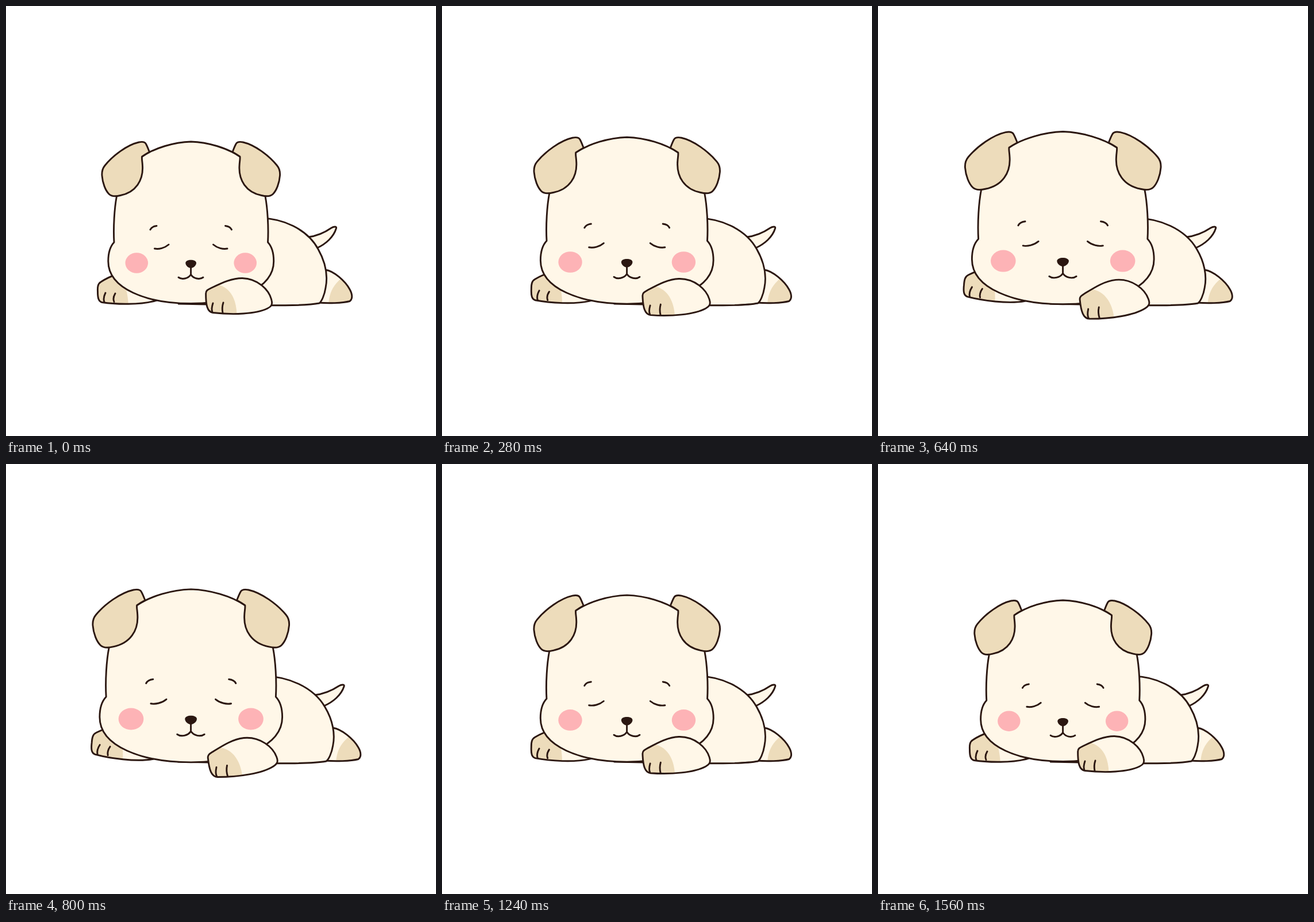
Animation, 748 px wide and 748 px high, one loop 1.64 s. Source, as an HTML page:

```html
<!DOCTYPE html>
<html lang="en">
<head>
<meta charset="utf-8">
<title>Sleeping puppy</title>
<style>
html, body { margin: 0; width: 100%; height: 100%; overflow: hidden; background: #fff; }
svg { display: block; width: 100%; height: 100%; }
path { vector-effect: non-scaling-stroke; }
.line { fill: none; stroke: #2b1711; stroke-width: 2.9; stroke-linecap: round; stroke-linejoin: round; }
.cream { fill: #fff7e8; }
.tan { fill: #eddcbb; }
.blush { fill: #fdb3b6; }
.dark { fill: #2b1711; }
</style>
</head>
<body>
<svg viewBox="0 0 748 748">
  <defs>
    <path id="footShape" d="M556 459C570 461 590 478 598 493C603 502 603 510 598 513.5C585 517 560 517.5 543 516L530 480Z"/>
    <path id="farShape" d="M192 467C183 470 174 474 165 480C160 483 159 488 159.5 497C159.5 508 161 514 167 515.5C190 519 235 520.5 262 512L240 470Z"/>
    <path id="nearShape" d="M347.7 500C347.7 495 351 493.5 356 491C375 482 392 473.5 411 473.5C438 474 458 494 462 512C464 520 461 523 455 526C435 536 395 537.5 360 533.5C350 532 347.5 520 347.7 500Z"/>
    <clipPath id="footClip"><use href="#footShape"/></clipPath>
    <clipPath id="farClip"><use href="#farShape"/></clipPath>
    <clipPath id="nearClip"><use href="#nearShape"/></clipPath>
    <g id="half">
      <path class="line tan" d="M249.5 254C247.5 249 246 244.5 243.5 240C241.5 236 237 235.8 231 237C211 241.5 186 260 172 277.5C167.5 283 166.5 288 167 295C168 308 173 321 179 327C184 332 191 331.5 199 329.5C226 324 239 303 237.5 278C237.2 270 236 267 236.5 262Q243 257.5 249.5 254Z"/>
      <ellipse class="blush" cx="227.3" cy="447" rx="19.8" ry="17.8"/>
      <path class="line" d="M258.5 422C266 423.5 276 421 283 415M251 389C253 385 257 383 262 382.5"/>
    </g>
  </defs>

  <g id="rear">
    <path class="line cream" d="M525 402C543 400 556 393 566 386C570 383.5 575.5 383 574.5 386.5C570 402 556 414 541 421L520 415Z"/>
    <use href="#footShape" class="cream"/>
    <path class="tan" clip-path="url(#footClip)" d="M583 474C568 487 562 500 561 520L610 520L610 474Z"/>
    <use href="#footShape" class="line"/>
    <path class="line cream" d="M440 369.5C480 368 524 388 543 423C556 446 560 470 556 490C554 503 549 514 545 517C520 522 460 521 400 520L300 518L330 400Z"/>
  </g>

  <g id="farArm">
    <use href="#farShape" class="cream"/>
    <path class="tan" clip-path="url(#farClip)" d="M150 460L195 460C206 478 212 497 213 522L150 525Z"/>
    <use href="#farShape" class="line"/>
    <path class="line" d="M173 499C170 505 169.5 511 171 515M190 500C187 505 186.5 511 188 514.5"/>
  </g>

  <g id="head">
    <path class="line cream" d="M321.75 236C352 237 385 247 407 262C428 275 445 300 451 331C455 352 457 385 455.5 411C463 419 465.7 432 465.7 444C465.7 492 398.5 517.5 321.75 517.5C245 517.5 177.8 492 177.8 444C177.8 432 180.5 419 188 411C186.5 385 188.5 352 192.5 331C198.5 300 215.5 275 236.5 262C258.5 247 291.5 237 321.75 236Z"/>
    <use href="#half"/>
    <use href="#half" transform="matrix(-1 0 0 1 643.5 0)"/>
    <path class="dark" d="M312.3 447C312.3 440 331 440 331 447C331 452 325 456 321.6 456C318 456 312.3 452 312.3 447Z"/>
    <path class="line" d="M321.6 455V467M300 472C306 476.5 317 474.5 321.6 467C326 474.5 337 476.5 343 472"/>
  </g>

  <g id="nearArm">
    <use href="#nearShape" class="cream"/>
    <path class="tan" clip-path="url(#nearClip)" d="M340 480L367 484C389 489 401.5 508 401.5 540L340 540Z"/>
    <use href="#nearShape" class="line"/>
    <path class="line" d="M360 517C358 523 357.5 529 359 532.5M378 516C376 522 376 529 377 534"/>
  </g>
</svg>
<script>
const LOOP = 1640, STEP = 40, LAST = 1560;

// Breath level over time: steady rise, rounded peak, steady fall.
const KEYS = [[0, 0], [160, .26], [440, .69], [640, 1], [740, 1.075], [960, .852], [1240, .452], [1560, -.058]];

const part = id => document.getElementById(id);
const rear = part('rear'), farArm = part('farArm'), head = part('head'), nearArm = part('nearArm');

function slope(i) {
  const a = KEYS[Math.max(i - 1, 0)], b = KEYS[Math.min(i + 1, KEYS.length - 1)];
  return (b[1] - a[1]) / (b[0] - a[0]);
}

function breath(t) {
  let i = 0;
  while (i < KEYS.length - 2 && t > KEYS[i + 1][0]) i++;
  const [t0, v0] = KEYS[i], [t1, v1] = KEYS[i + 1];
  const w = t1 - t0, u = (t - t0) / w, r = 1 - u;
  return r * r * ((1 + 2 * u) * v0 + u * w * slope(i)) +
         u * u * ((3 - 2 * u) * v1 - r * w * slope(i + 1));
}

// Move, turn and scale a part around its pivot.
function pose(el, x, y, { dx = 0, dy = 0, turn = 0, sx = 1, sy = sx }) {
  el.setAttribute('transform',
    `translate(${x + dx} ${y + dy}) rotate(${turn}) scale(${sx} ${sy}) translate(${-x} ${-y})`);
}

function draw(t) {
  const b = breath(t);
  const limb = Math.max(b, 0) ** 1.15; // limbs and rear start more softly
  pose(head, 321.75, 498, { sx: 1 + .1 * b, sy: 1 + .0668 * b });
  pose(rear, 317, 0, { sx: 1 + .051 * limb, sy: 1 });
  pose(farArm, 260, 513, { dx: -6 * limb, dy: limb, turn: 6.4 * limb, sx: 1 + .065 * limb });
  pose(nearArm, 462.5, 515, { dx: 9 * limb, dy: -1.5 * limb, turn: -6.2 * limb, sx: 1 + .04 * limb });
}

const start = performance.now();
function tick() {
  const t = (performance.now() - start) % LOOP;
  draw(Math.min(Math.floor(t / STEP) * STEP, LAST));
  requestAnimationFrame(tick);
}
draw(0);
requestAnimationFrame(tick);
</script>
</body>
</html>
```
